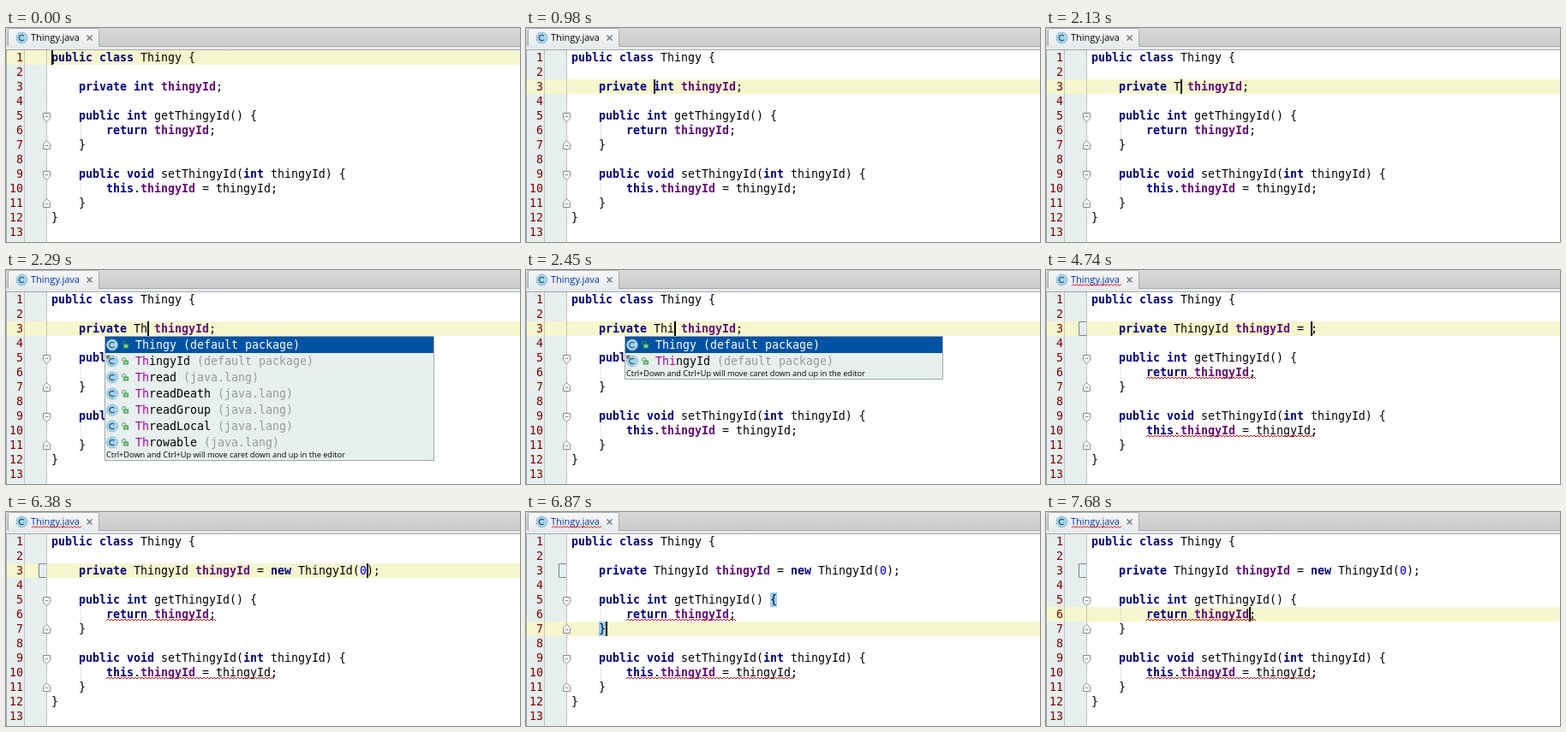
Write an HTML page that moves like this. It is 600 px wide and 250 px high and loops after 8000 ms.

```html
<!DOCTYPE html>
<html lang="en">
<head>
<meta charset="utf-8">
<title>Editor</title>
<style>
  html, body { margin: 0; width: 100%; height: 100%; overflow: hidden; background: #fff; }
  svg { display: block; }
  text { white-space: pre; }
  .mono { font: 13.29px "DejaVu Sans Mono", monospace; }
  .ui { font-family: "Open Sans", sans-serif; }
  .num { fill: #800000; }
  .kw { fill: #000080; font-weight: bold; }
  .field { fill: #660e7a; font-weight: bold; }
  .lit { fill: #0000ff; }
  .match { fill: #a800a8; }
  .pkg { fill: #999; }
  .picked, .picked tspan { fill: #fff; }
  .wave { fill: none; stroke: #e00000; stroke-width: 1; }
  .dots { stroke: #999; stroke-dasharray: 1 1; }
  .fold { fill: #fff; stroke: #8c8c8c; }
</style>
</head>
<body>
<svg id="stage" width="600" height="250" viewBox="0 0 600 250">
  <defs>
    <linearGradient id="bar" x2="0" y2="1">
      <stop stop-color="#d9d9d9"/><stop offset="1" stop-color="#cbcbcb"/>
    </linearGradient>
    <linearGradient id="tab" x2="0" y2="1">
      <stop stop-color="#f6f7f8"/><stop offset="1" stop-color="#e8ebed"/>
    </linearGradient>
    <g id="cls">
      <circle r="6.5" fill="#a5d5ee" stroke="#84b4d0" stroke-width=".8"/>
      <path d="M2.4-2.1A3.2 3.2 0 1 0 2.4 2.1" fill="none" stroke="#33566c" stroke-width="1.3"/>
    </g>
    <g id="lock" fill="none" stroke="#3f9a4c">
      <path d="M-3.5 0V-2a2 2 0 0 1 4 0V0"/>
      <rect x="-1.5" y="-.5" width="5" height="4" fill="#8fcf95"/>
    </g>
  </defs>
  <rect width="600" height="250" fill="#fff"/>
  <rect y="26" width="48" height="224" fill="#e6eeee"/>
  <g id="under"></g>
  <path class="dots" d="M21.5 26V250M47.5 26V250"/>
  <path d="M87.5 111v17M87.5 179v17" stroke="#ccc" stroke-dasharray="1 1"/>
  <path d="M.5 0V250" stroke="#a5a9ac"/>

  <rect width="600" height="21" fill="url(#bar)"/>
  <rect y="21" width="600" height="4" fill="#e8ebed"/>
  <path d="M108 21.5H600M0 25.5H600" stroke="#a6a9ac"/>
  <path d="M2.5 22V2.5q0-2 2-2H106.5q2 0 2 2V22" fill="url(#tab)" stroke="#a6a9ac"/>
  <use href="#cls" x="18.5" y="11.5"/>
  <path d="M94.5 8.5l6 6M100.5 8.5l-6 6" stroke="#747a80" stroke-width="1.5"/>
  <g id="live"></g>
</svg>
<script>
const LEFT = 53, CELL = 8, LINE = 17, ASCENT = 13, LOOP = 8000;
const under = document.getElementById('under');
const live = document.getElementById('live');
const rowY = row => 26 + LINE * (row - 1);
const colX = col => LEFT + CELL * col;
const rect = (x, y, w, h, fill, more = '') =>
  `<rect x="${x}" y="${y}" width="${w}" height="${h}" fill="${fill}" ${more}/>`;

// "@" marks a field name
const paint = code => code.replace(
  /@(\w+)|\b(public|class|private|int|return|void|this|new)\b|\b(\d+)\b/g,
  (all, field, kw, lit) =>
    `<tspan class="${field ? 'field' : kw ? 'kw' : 'lit'}">${field || kw || lit}</tspan>`);
const mono = (x, y, body, cls = '') => `<text class="mono ${cls}" x="${x}" y="${y}">${body}</text>`;

const source = decl => [
  'public class Thingy {', '', '    private ' + decl, '',
  '    public int getThingyId() {', '        return @thingyId;', '    }', '',
  '    public void setThingyId(int thingyId) {',
  '        this.@thingyId = thingyId;', '    }', '}', ''];

function wave(x1, x2, y) {
  let d = `M${x1} ${y + 2}`;
  for (let x = x1 + 2, up = true; x <= x2; x += 2, up = !up) d += `L${x} ${up ? y : y + 2}`;
  return `<path class="wave" d="${d}"/>`;
}

function fold(row, open) {
  const y = rowY(row) + (open ? 5.5 : 13.5), s = open ? 1 : -1;
  return `<path class="fold" d="M43.5 ${y}h8v${6 * s}l-4 ${4 * s}l-4 ${-4 * s}zM45.5 ${y + 4 * s}h4"/>`;
}

function popup({ items, hint, typed, width = 372 }) {
  const x = 115, y = 77, rowH = 19;
  const h = items.length * rowH + (hint ? 13 : 1);
  let out = rect(x + .5, y + .5, width - 1, h - 1, '#e8efef', 'stroke="#a0a6aa"');
  items.forEach(([name, pkg], i) => {
    const ry = y + 1 + i * rowH, mid = ry + 9.5;
    if (!i) out += rect(x + 1, ry, width - 2, rowH, '#0052a4');
    out += `<use href="#cls" x="124" y="${mid}"/><use href="#lock" x="139" y="${mid}"/>`;
    if (name === 'ThingyId') out += rect(117, mid - 7, 4, 4, '#777');
    out += mono(151, ry + 14, `<tspan class="match">${typed}</tspan>${name.slice(typed.length)}` +
      ` <tspan class="pkg">(${pkg})</tspan>`, i ? '' : 'picked');
  });
  if (hint) out += `<text class="ui" font-size="9.2" x="117" y="${y + h - 4}">` +
    'Ctrl+Down and Ctrl+Up will move caret down and up in the editor</text>';
  return out;
}

const own = ['Thingy', 'ThingyId'].map(n => [n, 'default package']);
const lang = ['Thread', 'ThreadDeath', 'ThreadGroup', 'ThreadLocal', 'Throwable']
  .map(n => [n, 'java.lang']);
const init = 'ThingyId @thingyId';

// Each step changes only the listed properties
const steps = [
  [0, { row: 1, col: 0, decl: 'int @thingyId;' }],
  [500, { row: 2 }],
  [660, { row: 3 }],
  [820, { col: 4 }],
  [980, { col: 12 }],
  [1470, { col: 16, select: 'int ' }],
  [1630, { col: 15, select: 'int' }],
  [2130, { col: 13, select: '', decl: 'T @thingyId;' }],
  [2290, { col: 14, decl: 'Th @thingyId;', edited: true, list: { items: [...own, ...lang], hint: true, typed: 'Th', width: 385 } }],
  [2450, { col: 15, decl: 'Thi @thingyId;', list: { items: own, hint: true, typed: 'Thi' } }],
  [2610, { col: 16, decl: 'ThiI @thingyId;', list: { items: own.slice(1), hint: true, typed: 'Thi' } }],
  [2770, { col: 17, decl: 'ThiId @thingyId;' }],
  [3100, { col: 20, decl: init + ';', list: null }],
  [3430, { tabError: true, changed: true }],
  [3590, { errors: true, bulb: true }],
  [3920, { col: 21, bulb: false }],
  [4080, { col: 29 }],
  [4410, { col: 30, decl: init + ' ;' }],
  [4740, { col: 32, decl: init + ' = ;' }],
  [5070, { col: 35, decl: init + ' = new;' }],
  [5230, { col: 36, decl: init + ' = new ;' }],
  [5560, { col: 45, decl: init + ' = new ThingyId();' }],
  [5890, { col: 46, decl: init + ' = new ThingyId(0);' }],
  [6050, { argError: true }],
  [6380, { argError: false }],
  [6710, { row: 5, col: 30, braces: true }],
  [6870, { row: 7, col: 5 }],
  [7200, { row: 6, col: 24, braces: false }],
  [7680, { col: 23 }]
];
let acc = {};
const states = steps.map(([at, change]) => ({ at, ...(acc = { ...acc, ...change }) }));

function draw(s) {
  let back = rect(1, rowY(s.row), 599, LINE, '#f6f6ce');
  if (s.braces) back += rect(colX(29), rowY(5), CELL, LINE, '#99ccff') + rect(colX(4), rowY(7), CELL, LINE, '#99ccff');
  under.innerHTML = back;

  let out = `<text class="ui" font-size="11" x="29" y="15" fill="${s.edited ? '#0032a0' : '#000'}">Thingy.java</text>`;
  if (s.tabError) out += wave(30, 88, 16.5);

  source(s.decl).forEach((code, i) => {
    const y = rowY(i + 1) + ASCENT;
    out += mono(i < 9 ? 12 : 4, y, i + 1, 'num') + mono(LEFT, y, paint(code));
  });
  if (s.changed) out += rect(38, rowY(3), 9, LINE, '#e3eef1') +
    '<path d="M47 60.5H38.5V76.5H47" fill="none" stroke="#858585"/>';
  out += fold(5, true) + fold(7, false) + fold(9, true) + fold(11, false);

  if (s.select) out += rect(colX(12), rowY(3), CELL * s.select.length, LINE, '#526da5') +
    mono(colX(12), rowY(3) + ASCENT, '<tspan font-weight="bold">int</tspan>', 'picked');
  if (s.errors) out += wave(117, 245, rowY(6) + 14) + wave(117, 313, rowY(10) + 14);
  if (s.argError) out += wave(405, 432, rowY(3) + 14);
  if (s.bulb) out += '<circle cx="70" cy="65" r="4.5" fill="#f8dc62" stroke="#b99632"/>' + rect(68, 70, 4, 4, '#888');
  out += rect(colX(s.col), rowY(s.row), 2, LINE, '#000');
  if (s.list) out += popup(s.list);
  live.innerHTML = out;
}

const start = performance.now();
let shown = null;
function tick() {
  const t = (performance.now() - start) % LOOP;
  const now = states.filter(s => s.at <= t).pop() || states[0];
  if (now !== shown) draw(shown = now);
  requestAnimationFrame(tick);
}
tick();
</script>
</body>
</html>
```
